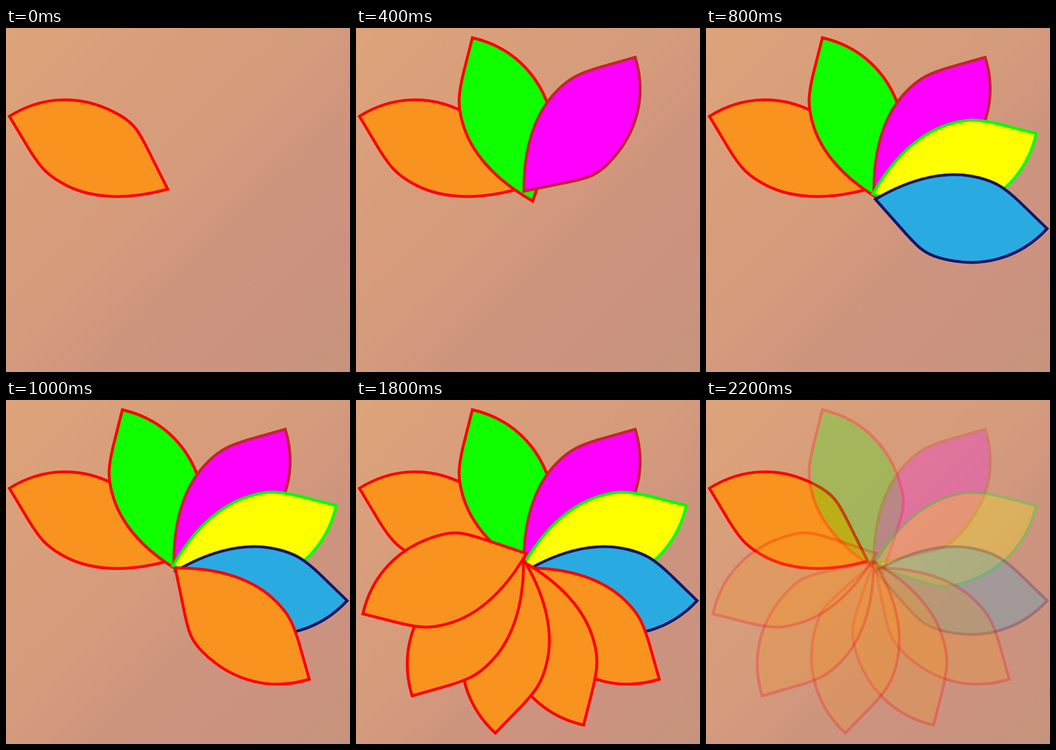
An HTML page for the animation above (2.3 s loop, 600 by 600 pixels).

```html
<!DOCTYPE html>
<html lang="en">
<head>
<meta charset="utf-8">
<title>Petals</title>
<style>
html, body { margin: 0; width: 100%; height: 100%; overflow: hidden; }
body { background: linear-gradient(135deg, #dda47a 0%, #d79d7b 30%, #d59c7c 44%, #cc937f 68%, #cb937f 82%, #c6947d 100%); }
svg { display: block; width: 100%; height: 100%; }
</style>
</head>
<body>
<svg id="flower" viewBox="0 0 600 600" stroke-width="5"></svg>
<script>
// One petal, drawn from its outer tip; the others are rotated copies.
const SHAPE = 'M0 0c54-34 124-42 194-1c25 15 32 29 46 56l36 72' +
  'c-72 20-137 17-185-11c-27-15-39-30-57-59z';
const ORANGE = ['#f7931e', '#f00'];

// outer tip x, y, rotation, fill, stroke
const PETALS = [
  [6, 154, 0, ...ORANGE],
  [203, 17, 45, '#0fff00', '#f00'],
  [487, 51, 105, '#f0f', '#c1272d'],
  [576, 184, 135, '#ff0', '#0f0'],
  [595, 350, 165, '#29abe2', '#1b1464'],
  [529, 487, 195, ...ORANGE],
  [397, 567, 225, ...ORANGE],
  [243, 581, 255, ...ORANGE],
  [98, 516, 285, ...ORANGE],
  [12, 373, 315, ...ORANGE]
];
const STEP = 100, STEPS = 23;

const flower = document.getElementById('flower');
flower.innerHTML = PETALS.map(([x, y, turn, fill, stroke]) =>
  `<path d="${SHAPE}" transform="translate(${x} ${y}) rotate(${turn})" fill="${fill}" stroke="${stroke}"/>`
).join('');
const paths = [...flower.children];

function draw(now) {
  const step = Math.floor(now / STEP) % STEPS;
  const fadeOut = (STEPS - step) / 4;
  paths.forEach((path, i) => {
    const fadeIn = step / 2 - (i - 1);
    path.style.opacity = i ? Math.max(0, Math.min(1, fadeIn, fadeOut)) : 1;
  });
}

const start = performance.now();
function tick() {
  draw(performance.now() - start);
  requestAnimationFrame(tick);
}
tick();
</script>
</body>
</html>
```
